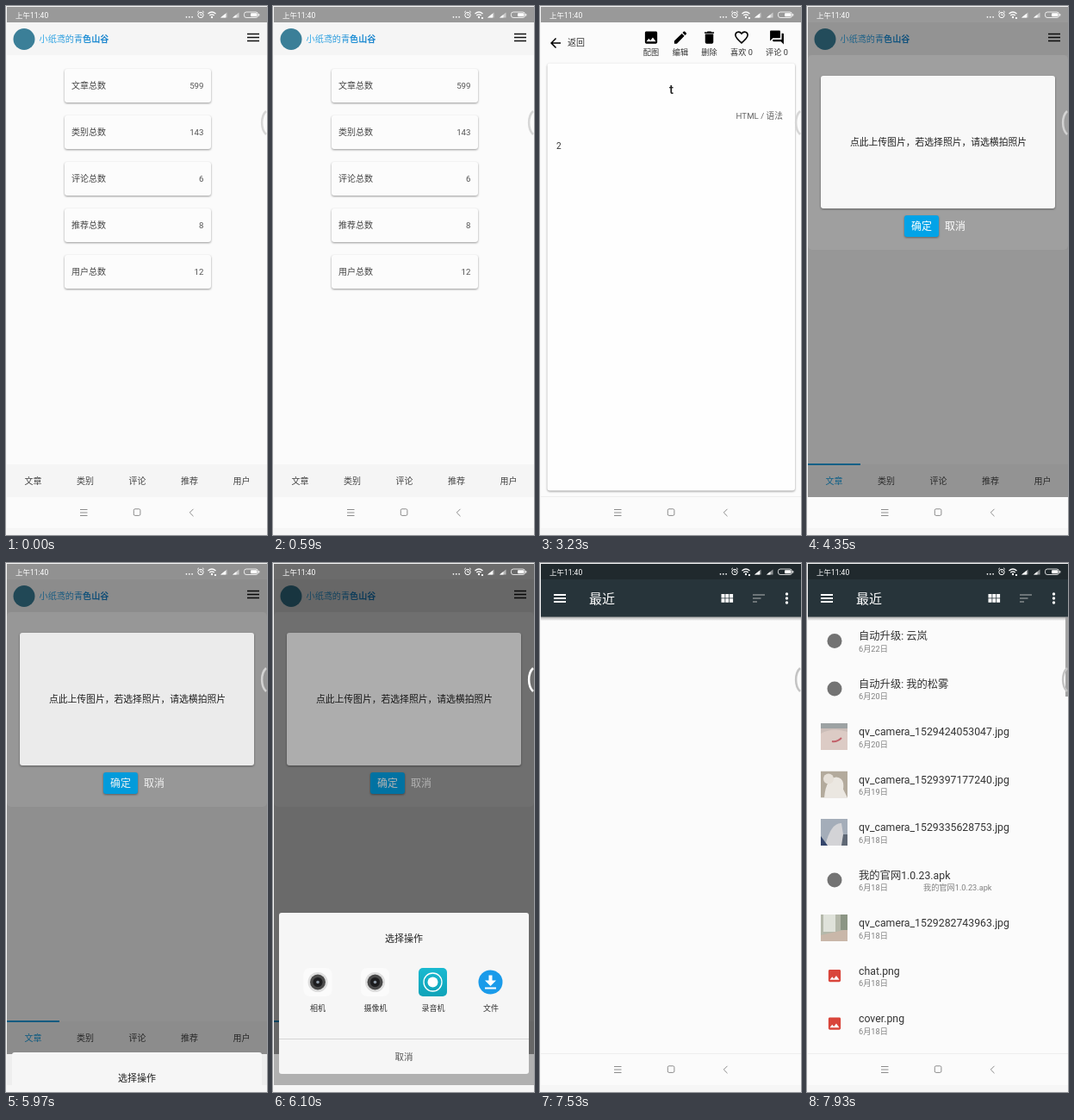
These frames come from a looping animation (303 px wide and 614 px high, 8000 ms). An HTML page:

```html
<!DOCTYPE html>
<html lang="zh-CN">
<head>
<meta charset="utf-8">
<style>
html, body { margin: 0; width: 100%; height: 100%; overflow: hidden; background: #f6f6f6; }
svg { display: block; width: 303px; height: 614px; font-family: Roboto, "Noto Sans CJK SC", "Noto Sans CJK", sans-serif; }
text { white-space: pre; }
.card { filter: drop-shadow(0 1px 1px rgba(0, 0, 0, .4)); }
</style>
</head>
<body>
<svg id="stage" viewBox="0 0 303 614"></svg>
<script>
const BLUE = '#1a9fe0';

// Shape helpers; text is placed by the middle of its line.
const rect = (x, y, w, h, fill, more = '') =>
  `<rect x="${x}" y="${y}" width="${w}" height="${h}" fill="${fill}" ${more}/>`;
const circle = (x, y, r, fill, more = '') =>
  `<circle cx="${x}" cy="${y}" r="${r}" fill="${fill}" ${more}/>`;
const line = (d, color, width = 1, more = '') =>
  `<path d="${d}" fill="none" stroke="${color}" stroke-width="${width}" ${more}/>`;
const text = (x, y, str, size, fill = '#333', anchor = 'start', weight = 400) =>
  `<text x="${x}" y="${y + size * .37}" font-size="${size}" fill="${fill}" text-anchor="${anchor}" font-weight="${weight}">${str}</text>`;
const icon = (d, x, y, size, more = '') =>
  `<path d="${d}" transform="translate(${x - size / 2} ${y - size / 2}) scale(${size / 24})" ${more}/>`;
const group = (id, body) => `<g id="${id}">${body}</g>`;
const bars = (x, y, w, gap, color, width) =>
  line([-gap, 0, gap].map(d => `M${x} ${y + d}h${w}`).join(''), color, width);

const ICONS = {
  back: 'M20 11H7.8l5.6-5.6L12 4l-8 8 8 8 1.4-1.4L7.8 13H20z',
  image: 'M21 19V5c0-1.1-.9-2-2-2H5c-1.1 0-2 .9-2 2v14c0 1.1.9 2 2 2h14c1.1 0 2-.9 2-2zM8.5 13.5l2.5 3 3.5-4.5 4.5 6H5z',
  edit: 'M3 17.2V21h3.8L17.8 9.9l-3.7-3.7zM20.7 7c.4-.4.4-1 0-1.4l-2.3-2.3c-.4-.4-1-.4-1.4 0l-1.9 1.8 3.8 3.8z',
  trash: 'M6 19c0 1.1.9 2 2 2h8c1.1 0 2-.9 2-2V7H6zM19 4h-3.5l-1-1h-5l-1 1H5v2h14z',
  heart: 'M12 20C5 14 3 11.5 3 8.5 3 4 9 2 12 6.5 15 2 21 4 21 8.5 21 11.5 19 14 12 20z',
  chat: 'M21 6h-2v9H6v2c0 .6.4 1 1 1h11l4 4V7c0-.6-.4-1-1-1zM17 12V3c0-.6-.4-1-1-1H3c-.6 0-1 .4-1 1v14l4-4h10c.6 0 1-.4 1-1z'
};

const tabs = ['文章', '类别', '评论', '推荐', '用户'];
const tabX = i => 31.5 + 60.5 * i;

const home = rect(1, 19, 302, 38, '#f5f5f5') +
  circle(21, 38.5, 12.5, '#3b7f98') +
  text(38.6, 38, '小纸鸢的青<tspan font-weight="700">色山谷</tspan>', 10.1, 'url(#titleInk)') +
  bars(280, 36.5, 14, 4, '#111', 1.7) +
  rect(1, 532, 302, 38, '#f5f5f5') +
  tabs.map((name, i) => text(tabX(i), 551, name, 10, '#444', 'middle')).join('');

const stats = [['文章总数', 599], ['类别总数', 143], ['评论总数', 6], ['推荐总数', 8], ['用户总数', 12]]
  .map(([name, n], i) => rect(68, 73 + 54 * i, 170, 39, '#fcfcfc', 'rx="3" class="card"') +
    text(76, 92.5 + 54 * i, name, 10, '#444') +
    text(229.5, 92.5 + 54 * i, n, 9.7, '#555', 'end')).join('');

const articles = ['t', '基于mol旧有站点的服务器端缓存BTP改造', '统一文档排版工具——quillaSetter',
  '使用dorvika进行前端页面自动打包', '基于create-palto-box的再配置', '使用tinted-partitions实现TPL in MK',
  'talvo-walker简明学习', '深入理解Nolvi', 'nolvi简明学习', 'darno简明学习', 'talvo性能优化'];
const list = rect(8, 66, 56, 26, '#f3f3f3', 'rx="2"') + text(16, 78, '类别筛选', 10, '#777') +
  line('M9 93.5H294', '#e8e8e8') +
  articles.map((title, i) => text(16, 113 + 38.45 * i, title, 9.2, '#222') +
    line(`M9 ${132.5 + 38.45 * i}H294`, '#eee')).join('') +
  rect(252.5, 493.5, 27, 26, '#979797', 'rx="2.5"') +
  line('M266 499v15M258.500 506.500h15', '#fff', 3) +
  rect(293, 93, 3, 8, '#b5b5b5', 'id="thumb"');

const activeTab = rect(1, 531, 61, 2, BLUE) +
  rect(20, 543, 24, 16, '#f5f5f5') + text(tabX(0), 551, tabs[0], 10, BLUE, 'middle');

const tools = [['image', 129, '配图'], ['edit', 163, '编辑'], ['trash', 196.5, '删除'],
  ['heart', 234, '喜欢 0'], ['chat', 275, '评论 0']];
const detail = rect(1, 19, 302, 551, '#fbfbfb') +
  icon(ICONS.back, 18, 43, 18) + text(32, 42.5, '返回', 10) +
  tools.map(([name, x, label]) =>
    icon(ICONS[name], x, 36.5, 19, name === 'heart' ? 'fill="none" stroke="#000" stroke-width="2"' : '') +
    text(x, 53.5, label, 9.2, '#333', 'middle')).join('') +
  rect(8.5, 66.5, 287.5, 496, '#fefefe', 'rx="3" class="card"') +
  text(152.5, 96, 't', 15, '#222', 'middle', 500) +
  text(282, 127.5, 'HTML / 语法', 9.7, '#666', 'end') + text(19, 162.5, '2', 10) +
  line('M1 569.500H303', '#eee');

const dialog = rect(1, 19, 302, 551, '#000', 'opacity=".4"') +
  rect(1, 57, 302, 226, '#fff', 'opacity=".08" rx="5"') +
  rect(16, 81, 272, 154, '#f8f8f8', 'rx="3" class="card"') +
  text(152.5, 158, '点此上传图片，若选择照片，请选横拍照片', 10.8, '#222', 'middle') +
  rect(113, 243, 40, 25, '#02a3e7', 'rx="3" class="card"') +
  text(133, 255.5, '确定', 12, '#fff', 'middle') + text(172, 255.5, '取消', 12, '#fff', 'middle');

const nav = rect(1, 570, 302, 36, '#fbfbfb') + bars(86, 588, 8.5, 3.5, '#8c8c8c', 1) +
  rect(148.3, 583.8, 7.6, 7.6, 'none', 'rx="1.5" stroke="#8c8c8c"') +
  line('M217.500 583.800l-4.200 4.200 4.200 4.200', '#8c8c8c');

const lens = x => rect(x - 16.5, 441, 33, 33, '#fbfbfb', 'rx="7"') +
  circle(x, 457.5, 11.5, '#dedede') + circle(x, 457.5, 9, '#4a4a4a') +
  circle(x, 457.5, 5.5, '#1d1d1f') + circle(x, 457.5, 1.8, '#8d99a5');
const actions = ['相机', '摄像机', '录音机', '文件'];
const sheet = rect(7, 377, 290, 187, '#f6f6f6', 'rx="3"') +
  text(152, 406.5, '选择操作', 11, '#222', 'middle', 500) + lens(52) + lens(118.5) +
  rect(169, 441, 33, 33, 'url(#teal)', 'rx="5"') +
  circle(185.5, 457.5, 10.5, 'none', 'stroke="#fff" stroke-width="1.3"') + circle(185.5, 457.5, 6, '#fff') +
  circle(252.5, 457.5, 14, '#1a9bea') +
  '<path d="M250.500 449.500h4v6h4.500l-6.500 6.500-6.500-6.500h4.500z" fill="#fff"/>' +
  rect(246, 463.5, 13, 2, '#fff') +
  circle(252.5, 457.5, 14.3, '#000', 'id="press" opacity=".3"') +
  actions.map((name, i) => text(52 + 67 * i, 487.5, name, 9, '#333', 'middle')).join('') +
  line('M7 523.500H297', '#d5d5d5') + text(152, 544, '取消', 10.5, '#555', 'middle');

const pickerTop = rect(1, 19, 302, 551, '#fbfbfb') + rect(1, 62, 302, 5, 'url(#shade)') +
  rect(1, 1, 302, 18, '#20292d') + rect(1, 19, 302, 43.5, '#27343a') +
  bars(16, 41, 14, 4, '#fff', 1.8) + text(57, 41.5, '最近', 15, '#fff') +
  [0, 1, 2, 3, 4, 5].map(i => rect(210.5 + i % 3 * 4.8, 36 + (i > 2) * 5.3, 4, 4.5, '#fff')).join('') +
  line('M247 37h14M247 41h9.500M247 45h5', '#84898c', 1.7) +
  [-5, 0, 5].map(d => circle(286.5, 41 + d, 1.7, '#fff')).join('') +
  line('M1 569.500H303', '#eee');

const photo = (y, base, shapes) => `<svg x="16" y="${y - 15.5}" width="31" height="31">${rect(0, 0, 31, 31, base)}${shapes}</svg>`;
const thumbs = {
  2: y => photo(y, '#cbbdb8', '<path d="M0 12Q14 4 31 10V31H0z" fill="#dccbc5"/><path d="M13 21q6 1 11-4" fill="none" stroke="#c2616a" stroke-width="2"/>' + rect(0, 0, 31, 6, '#9da2a3')),
  3: y => photo(y, '#b3aa9c', '<path d="M4 31Q6 8 18 7q10 1 8 14L31 31z" fill="#ebe7e1"/>' + circle(9, 9, 6, '#e6e0d8')),
  4: y => photo(y, '#a4adb9', '<path d="M5 31Q12 4 24 5l4 26z" fill="#d3d3d6"/><path d="M0 20l8 11H0z" fill="#34456b"/><path d="M26 18h5v13h-7z" fill="#5f6875"/>'),
  6: y => photo(y, '#b4b8aa', rect(3, 0, 14, 20, '#dfe2da') + '<path d="M0 24L31 17V31H0z" fill="#c9b7a9"/>' + rect(23, 0, 8, 18, '#8b9584'))
};
const files = [['自动升级: 云岚', 22], ['自动升级: 我的松雾', 20], ['qv_camera_1529424053047.jpg', 20],
  ['qv_camera_1529397177240.jpg', 19], ['qv_camera_1529335628753.jpg', 18], ['我的官网1.0.23.apk', 18],
  ['qv_camera_1529282743963.jpg', 18], ['chat.png', 18], ['cover.png', 18]];
const fileRows = files.map(([name, day], i) => {
  const y = 84.5 + 55.5 * i, mid = y + 6;
  const mark = thumbs[i] ? thumbs[i](mid) :
    i > 6 ? icon(ICONS.image, 32, mid, 19, 'fill="#d9453b"') : circle(32, mid, 8.5, '#737373');
  return mark + text(60, y, name, 12.3) + text(60, y + 15, `6月${day}日`, 9.2, '#808080') +
    (i === 5 ? text(135, y + 15, name, 9.2, '#808080') : '');
}).join('') + rect(300, 63, 3, 92, '#a3a3a3');

const signal = (x, level) => `<path d="M${x} 13.500h7.500V7.500z" fill="#fff" opacity=".5"/>` +
  `<path d="M${x} 13.500h${level}v${-level * .8}z" fill="#fff"/>`;
const status = text(11, 10.5, '上午11:40', 8.5, '#fff') +
  [209.5, 212.8, 216.1].map(x => circle(x, 12.8, .9, '#fff')).join('') +
  circle(226, 10.5, 3.2, 'none', 'stroke="#fff"') +
  line('M226 8.500v2.200h1.600M222 7.500l2-1.800M230 7.500l-2-1.800', '#fff', .9) +
  line('M234.500 9q4.500-4 9 0M236.300 11q2.700-2.400 5.400 0', '#fff', 1.2) + circle(239, 13, 1.2, '#fff') +
  rect(242, 13, 2, 2, '#fff', 'id="link"') + signal(249, 6) + signal(263, 4.5) +
  rect(276.5, 7, 16, 6.5, 'none', 'rx="2.500" stroke="#fff" stroke-width=".8"') +
  rect(284, 8.2, 7.5, 4.1, '#fff', 'rx="1"') + rect(293.3, 9, 1, 2.6, '#fff');

document.getElementById('stage').innerHTML = `<defs>
  <linearGradient id="titleInk"><stop stop-color="#34abe9"/><stop offset="1" stop-color="#1b84cc"/></linearGradient>
  <linearGradient id="teal" x2="0" y2="1"><stop stop-color="#19b9d0"/><stop offset="1" stop-color="#0fa3b8"/></linearGradient>
  <linearGradient id="shade" x2="0" y2="1"><stop stop-opacity=".35"/><stop offset="1" stop-opacity="0"/></linearGradient>
  <clipPath id="screen"><path d="M1 1H303V606H1z"/></clipPath></defs>
  ${rect(0, 0, 303, 614, '#f6f6f6')}<g clip-path="url(#screen)">` +
  rect(1, 1, 302, 605, '#fbfbfb') + rect(1, 1, 302, 18, '#999') +
  group('home', home) + group('stats', stats) + group('list', list) + group('activeTab', activeTab) +
  group('detail', detail) + group('dialog', dialog) + nav +
  rect(1, 1, 302, 605, '#000', 'id="dim"') + group('sheet', sheet) +
  group('picker', pickerTop) + group('fileRows', fileRows) + status +
  '<path id="handle" d="M302 122C295.500 128 295.500 143 302 149" fill="none" stroke-width="2.500"/></g>';

const $ = id => document.getElementById(id);
const show = (id, on) => $(id).style.display = on ? '' : 'none';

function draw(now) {
  const t = now % 8000;
  const within = (a, b) => t >= a && t < b;
  show('link', t >= 590);
  show('home', !within(3230, 4350));
  show('stats', t < 2150);
  show('list', within(2150, 3230));
  show('activeTab', t >= 2150 && !within(3230, 4350));
  show('detail', within(3230, 4350));
  show('dialog', within(4350, 7530));
  show('sheet', within(5970, 7530));
  show('press', within(6970, 7250));
  show('picker', t >= 7530);
  show('fileRows', t >= 7930);
  $('thumb').setAttribute('opacity', t < 2430 ? 1 : t < 2550 ? .5 : 0);
  $('dim').setAttribute('opacity', !within(5970, 7530) ? 0 : t < 6100 ? .05 : .3);
  $('sheet').setAttribute('transform', `translate(0 ${t < 6100 ? 191 : t < 6260 ? 29 : 0})`);
  $('handle').setAttribute('stroke', t < 4350 ? '#d6d6d6' : t < 6100 ? '#d2d2d2' : t < 7530 ? '#fff' : '#c4c4c4');
  requestAnimationFrame(draw);
}
draw(performance.now());
</script>
</body>
</html>
```
